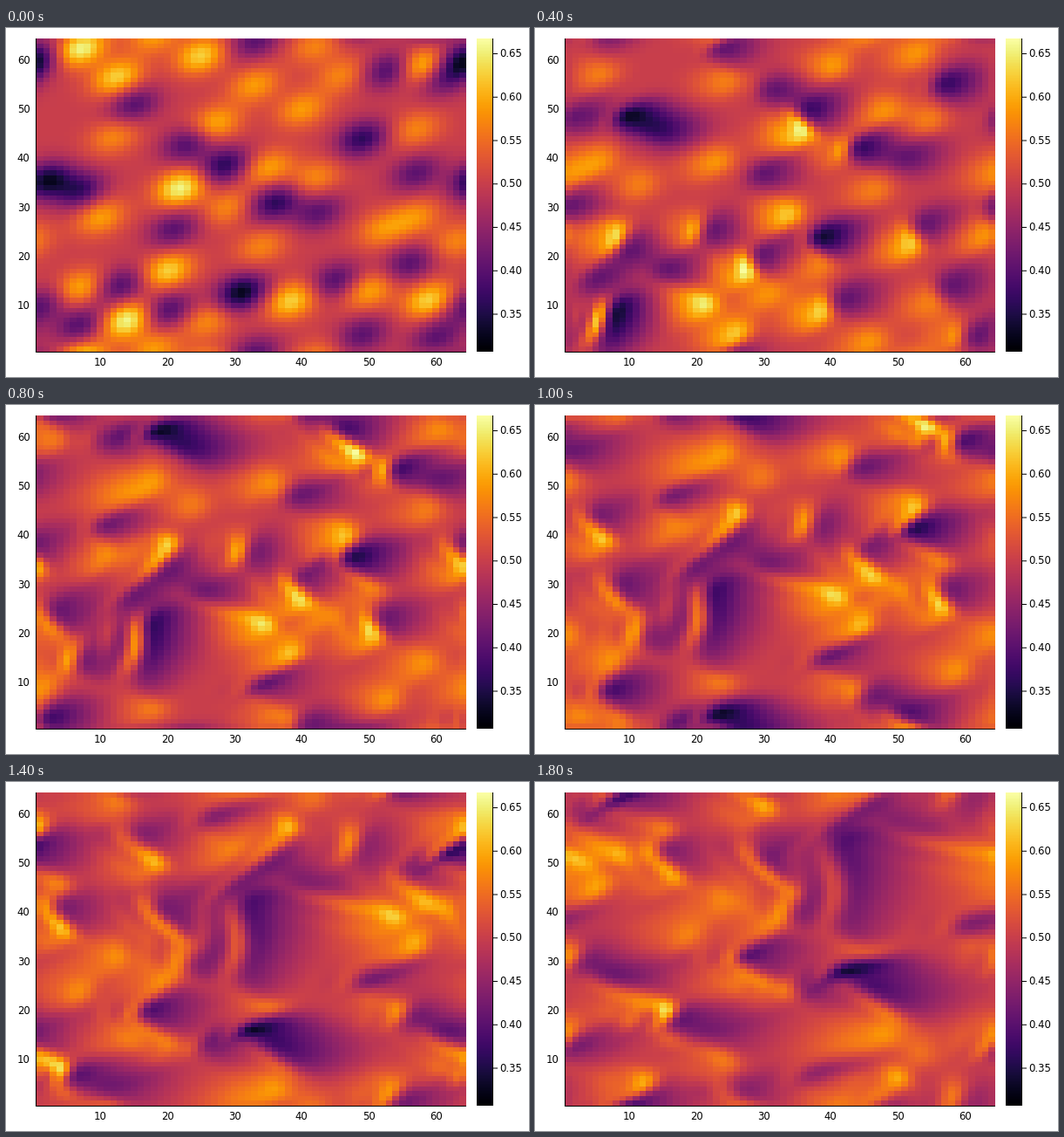
Animation of 600x400 px, one loop 2 s. Source, as a matplotlib script:

```python
import numpy as np
import matplotlib.pyplot as plt
from matplotlib.animation import FuncAnimation

N = 64
FRAMES, STEP_MS = 10, 200
SUBSTEPS = 40
SPEED = 11.2            # cells per frame for a field value of 1
VISCOSITY = 0.06
DAMPING = 0.3           # share of third-order upwinding; low values leave ripples
VMIN, VMAX = 0.3068, 0.6676
LEFT, RIGHT, TOP, BOTTOM = 35, 528, 12, 371
BAR_LEFT, BAR_RIGHT = 540, 558

# Main crests and hollows of the starting field: level -> cells
FIELD = {
    0.66: [(7, 62.5), (22, 34), (14, 7)],
    0.63: [(12.5, 56.5), (25, 61), (20, 17), (38.5, 11), (59, 11)],
    0.59: [(27, 47), (33, 55), (40, 50), (52, 25.5), (57, 28), (10, 28),
           (35, 38), (58, 59), (7, 13.5), (50, 13), (18, 1)],
    0.57: [(42, 63), (12, 44.5), (29, 30), (63, 23), (34, 22), (42, 36),
           (57, 46), (46, 57), (26, 7)],
    0.40: [(33, 64), (42.5, 29), (21, 25.5), (13, 14), (20, 9), (7, 6),
           (1, 10), (45, 15), (56, 18.5), (49, 4), (57, 37), (60, 3.5),
           (53, 58), (61, 56), (23, 43), (15, 51)],
    0.36: [(49, 44), (36, 31), (28.5, 38.5), (7, 33.5)],
    0.32: [(64, 60), (2, 35.5), (31, 12.5)],
}
# Places that rise faster or slower, cells per frame
RISE = {
    6.8: [(64, 61), (2, 35), (59, 12)],
    5.0: [(61, 54), (14, 7), (52, 58), (50, 3)],
}


def kernel(xa, ya, xb, yb, width):
    """Periodic bump, slightly stretched along the rising diagonal."""
    half = N / 2
    dx = (xa - xb + half) % N - half
    dy = (ya - yb + half) % N - half
    return np.exp(-(dx ** 2 + dy ** 2 - 0.5 * dx * dy) / (2 * width ** 2))


def smooth_field(levels, base, width):
    """Periodic smooth surface through the given points."""
    px, py, values = np.array([(x, y, level) for level, cells in levels.items()
                               for x, y in cells]).T
    gram = kernel(px[:, None], py[:, None], px, py, width)
    weights = np.linalg.solve(gram + 0.03 * np.eye(len(px)), values - base)
    gy, gx = np.mgrid[1:N + 1, 1:N + 1]
    return base + kernel(gx[..., None], gy[..., None], px, py, width) @ weights


def slope(f, axis):
    """Central slope with a light upwind damping term."""
    a, b, c, d = (np.roll(f, s, axis) for s in (2, 1, -1, -2))
    return (a - 8 * b + 8 * c - d + DAMPING * (a - 4 * b + 6 * f - 4 * c + d)) / 12


def laplacian(f):
    return sum(np.roll(f, s, ax) for s in (1, -1) for ax in (0, 1)) - 4 * f


def rate(state):
    u, v = state
    return np.array([VISCOSITY * laplacian(f) - u * slope(f, 1) - v * slope(f, 0)
                     for f in state])


def advance(state):
    """One frame of the flow, third-order Runge-Kutta."""
    dt = 1 / SUBSTEPS
    for _ in range(SUBSTEPS):
        s1 = state + dt * rate(state)
        s2 = 0.75 * state + 0.25 * (s1 + dt * rate(s1))
        state = state / 3 + 2 / 3 * (s2 + dt * rate(s2))
    return state


def simulate():
    state = np.array([SPEED * smooth_field(FIELD, 0.5, 2.6),
                      smooth_field(RISE, 5.75, 4)])
    fields = []
    for _ in range(FRAMES):
        fields.append(state[0] / SPEED)
        state = advance(state)
    return fields


fields = simulate()

fig = plt.figure(figsize=(6, 4), dpi=100, facecolor="white")
ax = fig.add_axes([0, 0, 1, 1])
ax.axis("off")


def picture(data, left, right):
    return ax.imshow(data, cmap="inferno", vmin=VMIN, vmax=VMAX, origin="lower",
                     interpolation="nearest", aspect="auto",
                     extent=(left, right, BOTTOM, TOP))


def line(xs, ys):
    ax.plot(xs, ys, color="black", lw=0.72, solid_capstyle="butt", snap=False)


def label(x, y, text, ha):
    ax.text(x, y, text, ha=ha, va="baseline", fontsize=8.4,
            family="DejaVu Sans", color="black")


def height(part):
    return BOTTOM - part * (BOTTOM - TOP)


heat = picture(fields[0], LEFT, RIGHT)
picture(np.linspace(VMIN, VMAX, 256)[:, None], BAR_LEFT, BAR_RIGHT)
ax.set_xlim(0, 600)
ax.set_ylim(400, 0)

edge = BAR_RIGHT + 0.5
line([LEFT, RIGHT], [BOTTOM + 0.5] * 2)
line([LEFT - 0.5] * 2, [TOP, BOTTOM + 1])
line([edge] * 2, [TOP, BOTTOM])

for n in range(10, 61, 10):
    part = (n - 0.5) / N
    label(LEFT + part * (RIGHT - LEFT), 387, str(n), "center")
    label(27.5, height(part) + 4, str(n), "right")

for value in np.arange(0.35, 0.66, 0.05):
    y = height((value - VMIN) / (VMAX - VMIN))
    line([edge, 564], [y, y])
    label(566.5, y + 3.7, f"{value:.2f}", "left")


def draw(i):
    heat.set_data(fields[i])
    return [heat]


anim = FuncAnimation(fig, draw, frames=FRAMES, interval=STEP_MS, repeat=True,
                     repeat_delay=0, blit=False)
plt.show()
```
